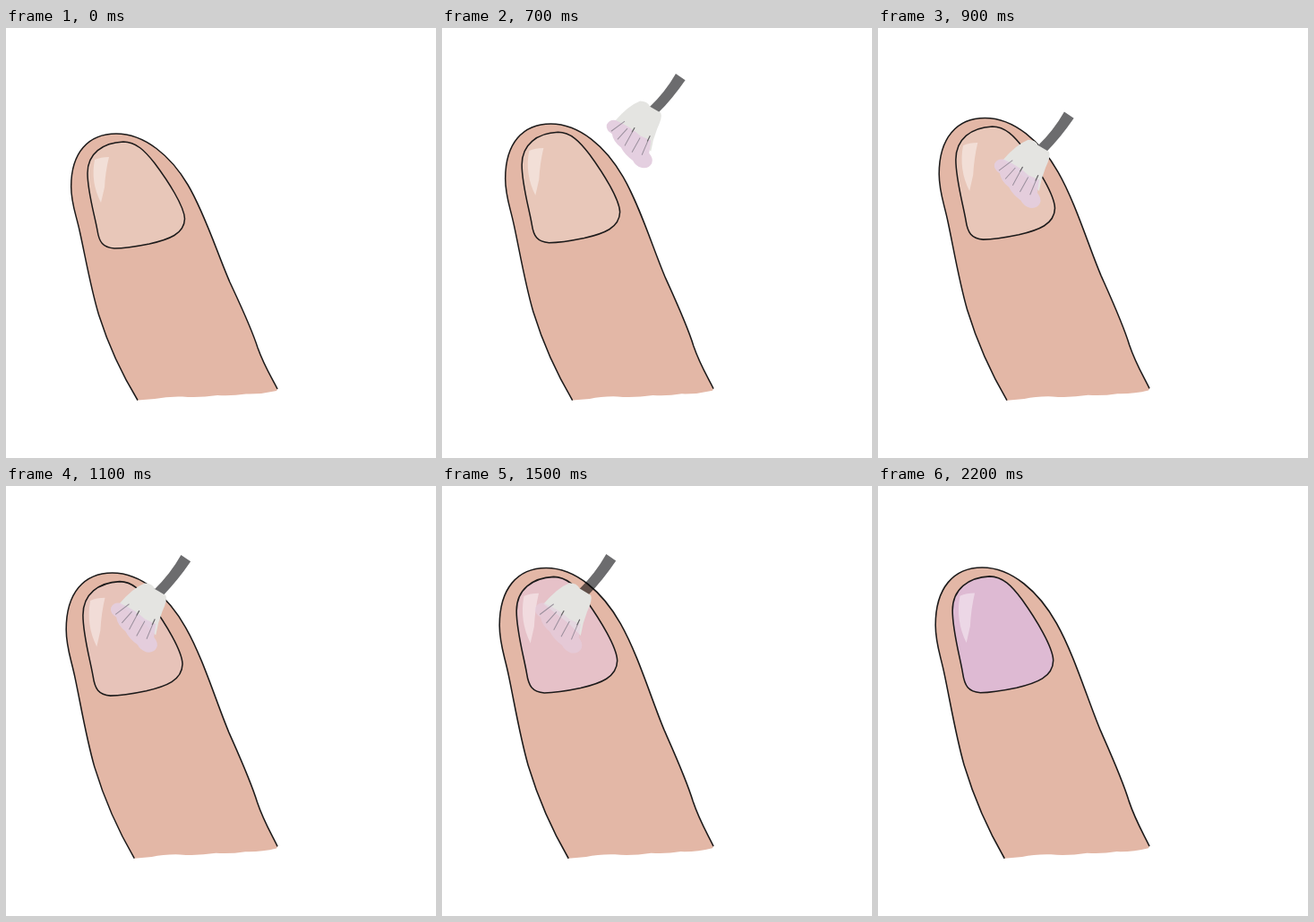
These frames come from a looping animation (480x480 px, 2.7 s). An HTML page:

```html
<!DOCTYPE html>
<html lang="en">
<head>
<meta charset="utf-8">
<title>Nail polish</title>
<style>
  html, body { margin: 0; width: 100%; height: 100%; overflow: hidden; background: #fff; }
  svg { display: block; width: 100vw; height: 100vh; }
  .line { fill: none; stroke: #1c1a1a; stroke-width: 1.5; }
</style>
</head>
<body>
<svg viewBox="0 0 480 480">
  <g id="finger">
    <path fill="#e3b7a6" d="M147 415.5C129 386 113 350 103.500 320C94.500 290 88.500 255 82.500 228C78 207 72.700 196 72.700 177C72.700 139 92 118 123 118C155 118 184 143 203 175C222 207 236 252 250 284C263 312 274 335 281 357C288 377 297 391 303 403L302 405Q285 409 268 408.500Q252 411 236 410Q215 413 197 411.500Q180 411 166 414Z"/>
    <path class="line" d="M147 415.5C129 386 113 350 103.500 320C94.500 290 88.500 255 82.500 228C78 207 72.700 196 72.700 177C72.700 139 92 118 123 118C155 118 184 143 203 175C222 207 236 252 250 284C263 312 274 335 281 357C288 377 297 391 303 403"/>
    <path id="nail" class="line" d="M131 127C145 127 155 137 166 151C181 171 199 199 199.500 213C199 230 182 236 160 241C145 244 130 246 121 246C108 245 104 239 102 226C99 209 91 183 91 162C91 140 108 128 131 127Z"/>
    <path fill="#fff" opacity=".42" d="M99 147Q106 144 115 144Q111 160 110 178L106 195Q94 172 99 147Z"/>
  </g>
  <g id="brush">
    <path id="handle" fill="#6c6c6e" d="M270.500 53L281 60Q267 80 251 96L241 90Q259 73 270.500 53Z"/>
    <path fill="#e4e4e1" d="M203 105Q218 88 231 83Q239 83 242 89L254 96Q256 101 250 113Q245 125 243 138L230 125Z"/>
    <path id="bristles" fill="#e4cfe0" d="M204 104Q222 112 231 121L243 126Q242 134 241 140Q246 146 244 151Q241 157 233 156Q226 154 223 148Q214 142 210 134Q201 127 200 119Q193 115 194 109Q197 103 204 104Z"/>
    <g fill="none">
      <path stroke="#8f8592" opacity=".85" d="M214 105L199 116M217 113L206 125M225 112L214 132M231 123L222 139M242 121L233 142"/>
      <path stroke="#666" d="M225 112L222 117M242 121L239 127"/>
    </g>
  </g>
</svg>
<script>
const LOOP = 2700;
const PIVOT = { x: 303.5, y: 413 };
const part = id => document.getElementById(id);

// start, finger left, finger top, nail colour, brush [dx, dy, bristle opacity]
const poses = [
  [0, 73, 118, '#e8c7b9'],
  [500, 73, 113, '#e8c7b9', [0, 0, 1]],
  [700, 71, 107, '#e8c7b9', [-9.5, -2, 1]],
  [800, 70, 104, '#e8c7b9', [-36, 18, 1]],
  [900, 68.5, 100.5, '#e8c6b8', [-62.5, 40.5, 0.9]],
  [1100, 67.5, 97, '#e7c3b9', [-75, 24, 0.9]],
  [1300, 67.5, 94, '#e6c0ba', [-84, 49, 0.9]],
  [1500, 64.5, 91.5, '#e6c1c8', [-87, 23, 0.6]],
  [1700, 64.5, 91, '#e5c2d2', [-88, 51, 0.35]],
  [2200, 64.5, 91, '#debad3'],
];

function scaleAbout(x, y, sx, sy) {
  return `translate(${x} ${y}) scale(${sx} ${sy}) translate(${-x} ${-y})`;
}

function draw(time) {
  const t = time % LOOP;
  const [start, left, top, colour, brush] = poses.findLast(p => p[0] <= t);
  const sx = (PIVOT.x - left) / (PIVOT.x - 73);
  const sy = (PIVOT.y - top) / (PIVOT.y - 118);

  part('finger').setAttribute('transform', scaleAbout(PIVOT.x, PIVOT.y, sx, sy));
  part('nail').style.fill = colour;
  part('brush').style.display = brush ? '' : 'none';
  if (brush) {
    const [dx, dy, opacity] = brush;
    part('brush').setAttribute('transform',
      `translate(${dx} ${dy}) ` + scaleAbout(276, 53, sx, sy / 1.017));
    part('bristles').style.opacity = opacity;
    // The handle turns translucent once the polish goes on.
    part('handle').style.mixBlendMode = start >= 1100 ? 'multiply' : 'normal';
  }
}

const begin = performance.now();
function tick() {
  draw(performance.now() - begin);
  requestAnimationFrame(tick);
}
tick();
</script>
</body>
</html>
```
